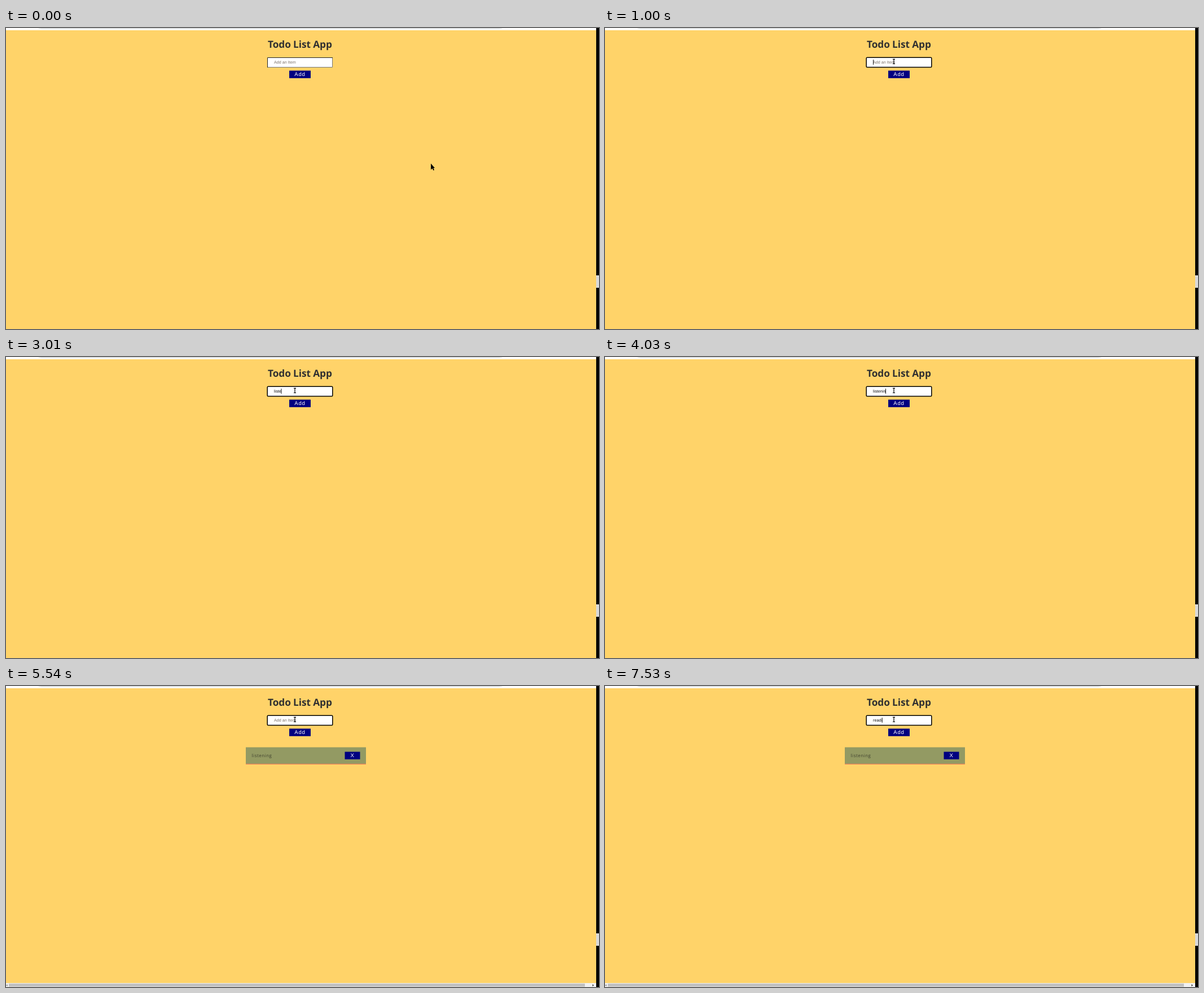
Recreate the animation shown at these times as an HTML page. Size 1051 px wide and 533 px high, loop 8000 ms.

```html
<!DOCTYPE html>
<html lang="en">
<head>
<meta charset="utf-8">
<title>Todo list</title>
<style>
  html, body { margin: 0; width: 100%; height: 100%; overflow: hidden; background: #ffd369; }
  svg { display: block; width: 1051px; height: 533px; }
  text { font-family: "Liberation Sans", Arial, sans-serif; text-rendering: geometricPrecision; white-space: pre; }
  .title { font: bold 17.3px "Open Sans", sans-serif; letter-spacing: -.1px; fill: #303030; }
  .button { font-size: 9.5px; letter-spacing: .8px; fill: #fff; }
  .item { font: 8px "Open Sans", sans-serif; letter-spacing: .5px; fill: #42432f; }
  #entry { font-size: 7.2px; }
</style>
</head>
<body>
<svg viewBox="0 0 1051 533">
  <rect width="1051" height="533" fill="#ffd369"/>
  <rect width="1046" height="4" fill="#fff"/>
  <path d="M57 0H880Q877 2 871 2H66Q60 2 57 0" fill="#e1e3e6"/>
  <rect x="1046" width="5" height="533"/>
  <rect x="1046" y="438" width="5" height="22" fill="#dadada"/>

  <text class="title" x="464" y="35">Todo List App</text>

  <g id="idle">
    <rect x="463" y="52" width="116" height="18" fill="#fff"/>
    <path d="M578.5 52V69.5H463" fill="none" stroke="#767676"/>
    <path d="M463.5 70V52.5H579" fill="none" stroke="#222"/>
  </g>
  <rect id="focus" x="463.2" y="52.2" width="115.6" height="17.2" rx="1.5" fill="#fff" stroke="#000" stroke-width="1.5"/>
  <text id="entry" x="475" y="63"></text>
  <rect id="caret" y="56" width=".9" height="9"/>

  <rect x="502" y="75.5" width="38" height="13.3" fill="#000080"/>
  <text class="button" x="511.3" y="85.3">Add</text>

  <g id="list">
    <rect x="425" y="108.5" width="213" height="30.5" fill="#939a63"/>
    <rect x="425" y="137.7" width="213" height="1.3" fill="#f0855a"/>
    <text class="item" x="435.6" y="126.4">listening</text>
    <rect x="600.5" y="116.5" width="27" height="13.3" fill="#000080"/>
    <text class="button" x="610.4" y="126.4">X</text>
    <rect y="526" width="1046" height="7" fill="#f1f1f1"/>
    <rect x="5" y="527" width="1021" height="5.5" fill="#c1c1c1"/>
    <path d="M2.5 528V532L.5 530Z" fill="#777"/>
    <path d="M1039.5 528V532L1042 530Z" fill="#333"/>
  </g>

  <path id="arrow" d="M753 240V251L755.6 248.6L757.3 252.2L759 251.4L757.4 247.9H760Z"/>
  <path id="beam" d="M-2-4H2M0-4V4.2M-2 4.2H2" fill="none" stroke="#000" stroke-width="1.2"/>
</svg>
<script>
  const $ = id => document.getElementById(id);
  const show = (id, on) => $(id).style.display = on ? "" : "none";

  // [start in ms, typed text, caret visible]
  const steps = [
    [0, "", false], [1000, "", true], [1500, "", false],
    [2010, "l", true], [2500, "list", true], [3010, "liste", true],
    [3520, "listeni", true], [4030, "listenin", true], [4530, "listenin", false],
    [5030, "listening", true], [5540, "", false], [6040, "", true],
    [6530, "re", true], [7040, "read", true], [7530, "readi", true]
  ];

  function draw(now) {
    const t = now % 8000;
    const [, typed, caretOn] = steps.findLast(([start]) => t >= start);
    const focused = t >= 1000;
    const entry = $("entry");

    show("idle", !focused);
    show("focus", focused);
    show("list", t >= 5540);
    show("arrow", t < 500);
    show("beam", t >= 500);
    $("beam").setAttribute("transform", focused ? "translate(512 59.3)" : "translate(511 62.5)");

    entry.textContent = typed || "Add an Item";
    entry.setAttribute("fill", typed ? "#111" : "#7a7068");
    show("caret", caretOn);
    $("caret").setAttribute("x", 475 + (typed ? entry.getComputedTextLength() - .3 : 0));
    requestAnimationFrame(draw);
  }
  draw(0);
</script>
</body>
</html>
```
